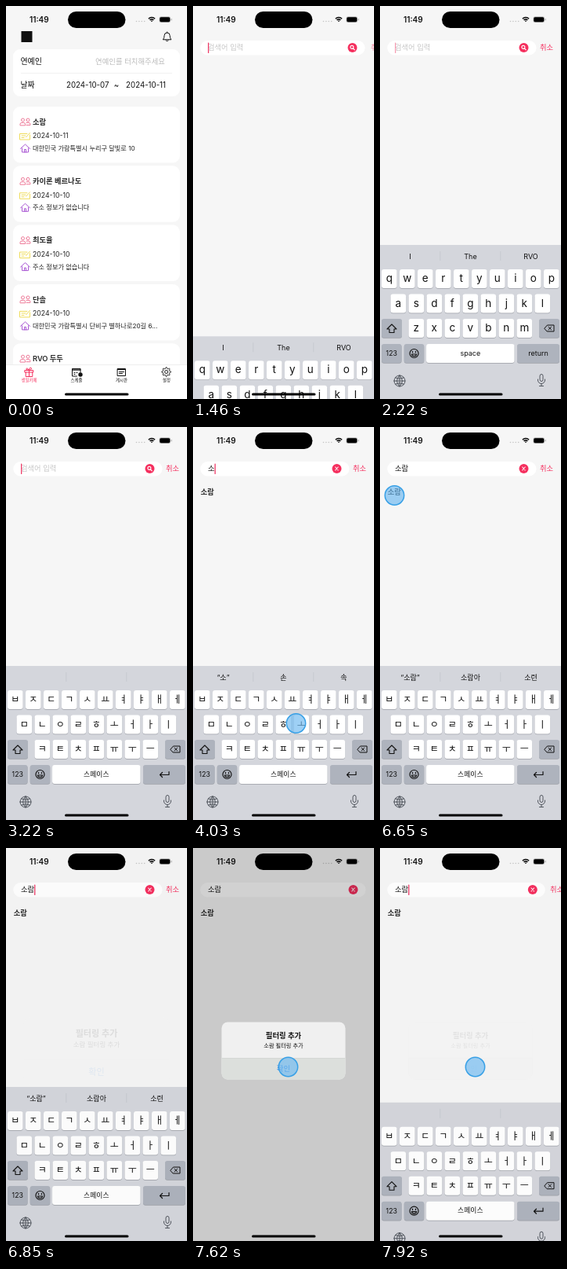
An HTML page with a canvas that plays this animation: 231x500 px, repeating every 8000 ms.

```html
<!DOCTYPE html>
<html lang="ko">
<head>
<meta charset="utf-8">
<style>
html, body { margin: 0; width: 231px; height: 500px; overflow: hidden; background: #f6f6f6 }
canvas { display: block; width: 231px; height: 500px }
</style>
</head>
<body>
<canvas id="stage"></canvas>
<script>
const W = 231, H = 500, LOOP = 8000;
const PINK = '#f5305f', INK = '#111', PAGE = '#f6f6f6', GREY_KEY = '#aeb3bd', GLYPH = '#50555d';
const NAME = '소람';

const BURSTS = [[0, 0, 1], [890, 1460, 7], [1600, 2010, 5], [2220, 2220, 1], [2410, 3120, 9],
  [3220, 3320, 2], [3500, 4220, 8], [4320, 4320, 1], [4510, 5240, 8], [5340, 6140, 9],
  [6320, 6430, 2], [6650, 7250, 7], [7620, 7620, 1], [7760, 7760, 1], [7920, 7920, 1]];
const TICKS = BURSTS.flatMap(([a, b, n]) =>
  Array.from({ length: n }, (_, i) => n > 1 ? a + (b - a) * i / (n - 1) : a));

// Field content and suggestions from a given time on
const TYPING = [
  [1600, '', ['I', 'The', 'RVO']],
  [3220, '', []],
  [3700, 'ㅅ', ['“ㅅ”', '사', '시']],
  [4000, '소', ['“소”', '손', '속']],
  [4650, '솔', ['“솔”', '솔직히', '솔로']],
  [4950, '소라', ['“소라”', '소라고', '소리']],
  [5700, NAME, [`“${NAME}”`, NAME + '아', '소련']],
  [7700, NAME, []],
];

// [from, to, x, y]
const TOUCHES = [[890, 1080, 155, 71], [2480, 2760, 25, 477], [3600, 3800, 104, 347],
  [3950, 4320, 131.5, 377], [4600, 4800, 92, 378], [4900, 5150, 182, 378],
  [5600, 5800, 23, 378], [6650, 6840, 18.5, 87], [7620, 8000, 121.5, 278.5]];

const CARDS = [
  ['소람', '2024-10-11', '대한민국 가람특별시 누리구 달빛로 10'],
  ['카이론 베르나도', '2024-10-10', '주소 정보가 없습니다'],
  ['최도율', '2024-10-10', '주소 정보가 없습니다'],
  ['단솔', '2024-10-10', '대한민국 가람특별시 단비구 별하나로20길 6...'],
  ['RVO 두두', '2024-10-10', '주소 정보가 없습니다'],
];
const KEYS = {
  en: ['qwertyuiop', 'asdfghjkl', 'zxcvbnm'],
  ko: ['ㅂㅈㄷㄱㅅㅛㅕㅑㅐㅔ', 'ㅁㄴㅇㄹㅎㅗㅓㅏㅣ', 'ㅋㅌㅊㅍㅠㅜㅡ'],
};

// Line icons, centred on 0,0
const ICONS = {
  people: 'M-5-2a2 2 0 1 0 4 0a2 2 0 1 0-4 0M1.5-2a2 2 0 1 0 4 0a2 2 0 1 0-4 0M-6.5 4.5v-1q0-2 2-2h2.5q2 0 2 2v1zM1.5 1.5h3q2 0 2 2v1h-5',
  ticket: 'M3-2.5h-9.5v7.500h13v-6M-4 0h5M-4 2.500h3M1.500 2l5-5.500',
  house: 'M-6 .5L0-5L6 .5M-4 0v5h8v-5M-1 5v-3.500h2v3.500',
  bell: 'M-5 3q1.5-1.5 1.5-5a3.5 3.5 0 0 1 7 0q0 3.5 1.5 5zM-1.5 4.5q1.5 1.5 3 0M0-5.5v-1',
  gift: 'M-5.3-2.5h10.600v2.5h-10.600zM-4.3 0v5.500h8.600v-5.500M0-2.5v8M0-2.500q-4 0-3.5-2t3.5 2q0-4 2.5-3t-2.5 3',
  calendar: 'M5 0v-4.500h-10.500v9.500h6M-5.500-4h10.500M-5.500-2.800h10.500M-3 .5h1M0 .5h1M-3 2.500h1',
  board: 'M-5-4.500h10v9h-10zM-5-3.500h10M-3-.5h6M-3 1.500h4',
  globe: 'M-7 0a7 7 0 1 0 14 0a7 7 0 1 0-14 0M-7 0h14M0-7v14M0-7q-7 7 0 14q7-7 0-14M-5.5-4q5.5 2.5 11 0M-5.5 4q5.5-2.5 11 0',
  mic: 'M-2-5.5a2 2 0 0 1 4 0v5a2 2 0 0 1-4 0zM-4.5-1v1a4.5 4.5 0 0 0 9 0v-1M0 4.5v3M-2.5 7.5h5',
  shift: 'M0-5.5l6 6h-3v4.5h-6v-4.5h-3z',
  erase: 'M-6 0l3.5-4h8.5v8h-8.5zM-1-1.8l3.6 3.6M2.6-1.8l-3.6 3.6',
  enter: 'M6-3.5v4h-11.5M-2.5-2.5l-3 3l3 3',
  smile: 'M-5.5 0a5.5 5.5 0 1 0 11 0a5.5 5.5 0 1 0-11 0M-3 1h6a3 2.5 0 0 1-6 0M-2-2.5v1.2M2-2.5v1.2',
  cross: 'M-1.7-2L1.7 2M1.7-2L-1.7 2',
  lens: 'M-2.6-.6a2 2 0 1 0 4 0a2 2 0 1 0-4 0M1 1l1.8 1.8',
};

const canvas = document.getElementById('stage'), ctx = canvas.getContext('2d');
const dpr = window.devicePixelRatio || 1;
canvas.width = W * dpr;
canvas.height = H * dpr;

const progress = (t, start, length) => Math.min(1, Math.max(0, (t - start) / length));
const easeOut = u => 1 - (1 - u) ** 3;
const easeInOut = u => (1 - Math.cos(Math.PI * u)) / 2;

function box(x, y, w, h, r, fill) {
  ctx.fillStyle = fill;
  ctx.beginPath();
  ctx.roundRect(x, y, w, h, r);
  ctx.fill();
}
function disc(x, y, r, fill) {
  box(x - r, y - r, 2 * r, 2 * r, r, fill);
}
// y is the optical middle of the line
function text(str, x, y, size, color = INK, weight = 400, align = 'left') {
  ctx.font = `${weight} ${size}px Inter, "Noto Sans CJK KR", "Noto Sans CJK", sans-serif`;
  ctx.fillStyle = color;
  ctx.textAlign = align;
  ctx.fillText(str, x, y + size * 0.37);
}
function icon(name, x, y, color = INK, width = 1) {
  ctx.save();
  ctx.translate(x, y);
  ctx.strokeStyle = color;
  ctx.lineWidth = width;
  ctx.lineJoin = ctx.lineCap = 'round';
  ctx.stroke(new Path2D(ICONS[name]));
  ctx.restore();
}
function layer(x, y, draw) {
  ctx.save();
  ctx.translate(x, y);
  draw();
  ctx.restore();
}

function statusBar() {
  text('11:49', 42.3, 17.5, 10, INK, 600, 'center');
  box(79, 7, 73.5, 21, 10.5, '#000');
  for (let i = 0; i < 4; i++) disc(166.5 + i * 3.4, 19.5, 0.8, '#c4c4c4');
  ctx.strokeStyle = '#000';
  ctx.lineCap = 'butt';
  ctx.lineWidth = 1.5;
  for (const r of [1, 3.4, 5.8]) {
    ctx.beginPath();
    ctx.arc(186, 20.3, r, -Math.PI * 0.75, -Math.PI * 0.25);
    ctx.stroke();
  }
  box(195.5, 13.5, 14.5, 7.5, 2.3, '#aaa');
  box(196.3, 14.3, 12.9, 5.9, 1.7, '#000');
  box(210.6, 16, 1, 2.5, 0.5, '#aaa');
}

function listScreen() {
  box(0, 30, W, H, 0, PAGE);
  box(19.5, 32, 14, 14, 0, INK);
  icon('bell', 205.6, 39.5);
  box(9, 55, 213, 60, 9, '#fff');
  box(19, 85, 193, 0.6, 0, '#e4e4e4');
  text('연예인', 18.4, 70.5, 10, INK, 500);
  text('연예인를 터치해주세요', 203, 70.5, 9.4, '#bcbcbc', 400, 'right');
  text('날짜', 18.4, 100, 9.8, INK, 500);
  text('2024-10-07', 77, 100, 9.7);
  text('~', 141, 100, 9.7, INK, 400, 'center');
  text('2024-10-11', 204, 100, 9.7, INK, 400, 'right');
  CARDS.forEach(([name, date, place], i) => {
    const y = 128 + i * 75.3;
    box(9, y, 213, 71.5, 9, '#fff');
    icon('people', 24.5, y + 19, '#ee7b99');
    icon('ticket', 24, y + 37, '#efdc5a');
    icon('house', 24.5, y + 53, '#a957d3');
    text(name, 34, y + 19.3, 9.3, '#2c2c2c', 600);
    text(date, 34, y + 37, 8.7, '#222');
    text(place, 34, y + 53, 8.2, '#222');
  });
  box(0, 456, W, 44, 0, '#fff');
  box(0, 456, W, 0.5, 0, '#ddd');
  icon('gift', 29.5, 466, PINK);
  icon('calendar', 90, 466);
  disc(95, 469, 2.7, INK);
  icon('board', 147.5, 466);
  gear(204.6, 465.5);
  [['생일카페', 29.5, PINK], ['스케줄', 90, INK], ['게시판', 147.5, INK], ['설정', 205, INK]]
    .forEach(([label, x, color]) => text(label, x, 476.5, 5.4, color, 500, 'center'));
}

function gear(x, y) {
  ctx.strokeStyle = INK;
  ctx.lineWidth = 1;
  ctx.beginPath();
  for (let i = 0; i <= 64; i++) {
    const a = i / 64 * Math.PI * 2, r = 5 + 0.8 * Math.tanh(3 * Math.cos(8 * a));
    ctx.lineTo(x + r * Math.cos(a), y + r * Math.sin(a));
  }
  ctx.moveTo(x + 2, y);
  ctx.arc(x, y, 2, 0, Math.PI * 2);
  ctx.stroke();
}

function searchScreen(t, typed, typedAt, bar) {
  box(0, 30, W, H, 0, PAGE);
  const right = 220.5 - 21 * bar;
  box(9.3, 44, right - 9.3, 18.5, 9.2, '#fff');
  text(typed || '검색어 입력', 19, 53, 9.3, typed ? INK : '#c6c6c6');
  if (bar > 0) {
    const caret = 19 + (typed ? ctx.measureText(typed).width : 0);
    const phase = Math.max(0, t - typedAt) % 1000;
    ctx.globalAlpha = 1 - progress(phase, 550, 140);
    box(caret, 46.5, 1.3, 13.5, 0.6, '#ee3c68');
    ctx.globalAlpha = Math.min(1, 0.5 + bar);
    text('취소', 204 + 24 * (1 - bar), 53, 9.3, PINK);
    ctx.globalAlpha = 1;
  }
  disc(right - 16, 53, 6, PINK);
  icon(typed ? 'cross' : 'lens', right - 16, 53, '#fff', 1.1);
  if (typed) text(NAME, 9.8, 83, 9.3, '#2c2c2c', 600);
}

function key(cx, cy, w, fill = '#fff') {
  box(cx - w / 2, cy - 11.3, w, 24, 3, '#9da0a7');
  box(cx - w / 2, cy - 12, w, 24, 3, fill);
}

function keyboard(korean, suggestions) {
  box(0, 304, W, 200, 0, '#d4d6dc');
  for (const x of [76.5, 153.5]) box(x, 312, 0.7, 12, 0, '#c0c3ca');
  suggestions.forEach((s, i) => text(s, 38.5 + 77 * i, 319, 9, INK, 400, 'center'));
  KEYS[korean ? 'ko' : 'en'].forEach((row, r) => {
    [...row].forEach((letter, i) => {
      const x = [11.8, 23.3, 46.3][r] + 23 * i, y = 347 + 31.5 * r;
      key(x, y, 19.6);
      text(letter, x, korean ? y : y - 0.8, korean ? 12 : 13.5, INK, 400, 'center');
    });
  });
  key(15, 410, 26, GREY_KEY);
  icon('shift', 15, 410.5, INK, 1.1);
  key(216, 410, 26, GREY_KEY);
  icon('erase', 216, 410);
  key(14.8, 442, 25.5, GREY_KEY);
  text('123', 14.8, 442, 8.8, INK, 400, 'center');
  key(43.5, 442, 25.5, GREY_KEY);
  icon('smile', 43.5, 442, INK, 1.2);
  key(115.3, 442, 112.5);
  text(korean ? '스페이스' : 'space', 115.3, 441.5, korean ? 8.8 : 9, INK, 400, 'center');
  key(202, 442, 54, GREY_KEY);
  if (korean) icon('enter', 202, 442, INK, 1.2);
  else text('return', 202, 441.5, 9, INK, 400, 'center');
  icon('globe', 25, 477, GLYPH);
  icon('mic', 206, 476, GLYPH);
}

function alertBox(t, opacity, scale) {
  ctx.globalAlpha = opacity;
  box(0, 0, W, H, 0, 'rgba(0,0,0,.18)');
  layer(115.5, 258, () => {
    ctx.scale(scale, scale);
    ctx.translate(-115.5, -258);
    box(36.5, 221.5, 158, 73, 8, '#f0f0f0');
    if (t >= 7620) box(36.5, 267, 158, 27.5, [0, 0, 8, 8], '#dcdfdc');
    box(36.5, 267, 158, 0.5, 0, '#cfcfcf');
    text('필터링 추가', 115.5, 239, 9.4, INK, 600, 'center');
    text(NAME + ' 필터링 추가', 115.5, 251.5, 7.2, INK, 400, 'center');
    text('확인', 115.5, 281, 9.4, '#2f86e8', 400, 'center');
  });
  ctx.globalAlpha = 1;
}

function touchDot(x, y) {
  disc(x, y, 12.2, 'rgba(112,186,240,.68)');
  ctx.strokeStyle = '#38a0e6';
  ctx.lineWidth = 1.5;
  ctx.stroke();
}

function render(t) {
  ctx.setTransform(dpr, 0, 0, dpr, 0, 0);
  box(0, 0, W, H, 0, PAGE);

  const [typedAt, typed, suggestions] = TYPING.findLast(s => s[0] <= t) || TYPING[0];
  const shown = (ease, length) =>
    t < 6850 ? ease(progress(t, 1396, length)) :
    t < 7700 ? 1 - ease(progress(t, 6850, length)) : ease(progress(t, 7706, length));
  const push = easeOut(progress(t, 1080, 360));
  const lift = shown(easeOut, 400);

  if (push < 1) layer(-70 * push, 0, listScreen);
  if (push > 0) layer(W * (1 - push), 0, () => searchScreen(t, typed, typedAt, shown(easeInOut, 450)));
  statusBar();
  if (lift > 0) layer(0, 196 * (1 - lift), () => keyboard(t >= 2800, suggestions));
  box(75, 492.5, 81.5, 3, 1.5, '#000');

  const appear = easeOut(progress(t, 6840, 300));
  const opacity = appear * (1 - progress(t, 7706, 230));
  if (opacity > 0) alertBox(t, opacity, 1.2 - 0.2 * appear);

  for (const [from, to, x, y] of TOUCHES) if (t >= from && t < to) touchDot(x, y);
}

function loop() {
  const now = performance.now() % LOOP;
  render(TICKS.findLast(tick => tick <= now));
  requestAnimationFrame(loop);
}
loop();
</script>
</body>
</html>
```
